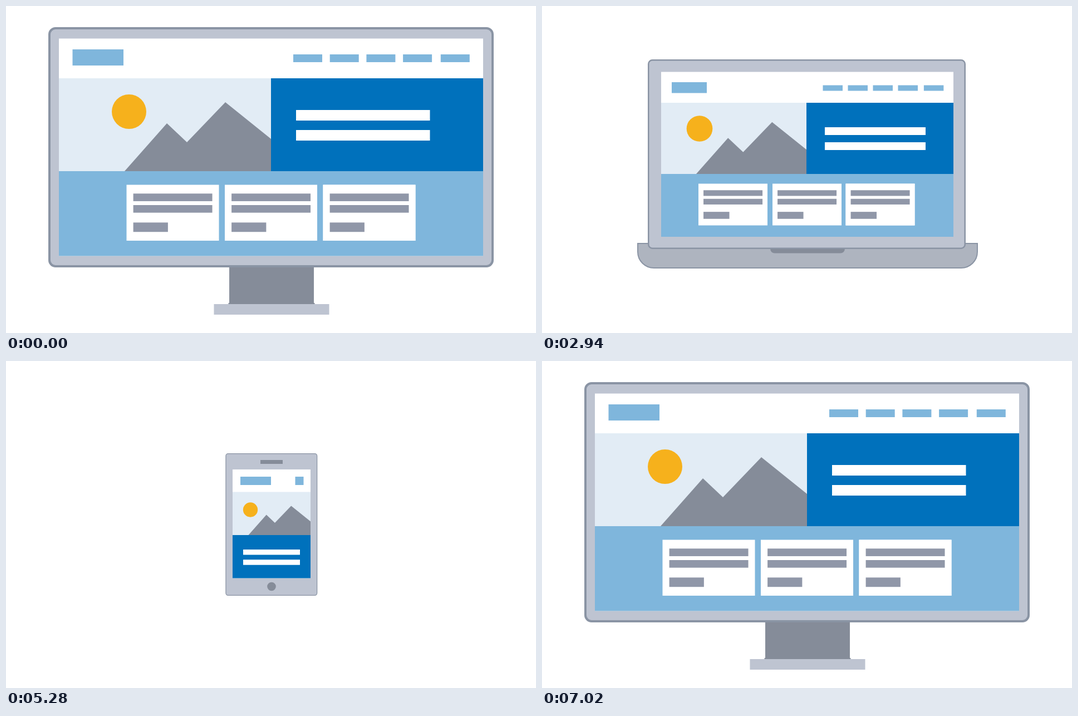
Recreate the animation shown at these times as an HTML page with a canvas. Size 952 px wide and 588 px high, loop 7050 ms.

```html
<!DOCTYPE html>
<html lang="en">
<head>
<meta charset="utf-8">
<title>Responsive layout</title>
<style>
html, body { margin: 0; width: 100%; height: 100%; overflow: hidden; background: #fff; }
canvas { display: block; }
</style>
</head>
<body>
<canvas id="stage" width="952" height="588"></canvas>
<script>
const ctx = document.getElementById('stage').getContext('2d');
const LOOP = 7050, STEP = 30;
const C = {
  shell: '#bec4d1', edge: '#8a94a4', dark: '#858c99', row: '#9097a8', base: '#aeb4bf',
  sky: '#e2ecf5', light: '#7fb6dc', blue: '#0071bc', sun: '#f6b11c', white: '#fff'
};

// body: cx, cy, width, height, border, radius, angle   screen, panel: left, top, right, bottom
// pic: right, top, bottom   nav: x, step, width, y, height   bars: x, y, width, height, gap
// card: width, height, y of row 1, y of row 2   cols: x of the four cards
const desktop = {
  body: [476, 254, 432, 800, 4, 11, -90], screen: [95, 58.5, 857, 449.5],
  pic: [476, 130, 297], panel: [476, 130, 857, 297], scale: [1], sun: [221, 190],
  logo: [119.5, 78, 91.5, 29], nav: [516, 65.7, 52, 87, 14], bars: [521, 187, 240.5, 19, 36],
  card: [166, 100.5, 321.5, 321.5], cols: [216.5, 393, 569.5, 569.5]
};
const laptop = {
  body: [475.5, 266.5, 341, 571, 2.5, 7, -90], screen: [214, 118.5, 739, 415],
  pic: [475, 174, 302], panel: [475, 174, 739, 302], scale: [.753], sun: [283, 220.5],
  logo: [233, 137, 63, 19.5], nav: [504.5, 45, 35.5, 142.5, 10], bars: [508, 218, 181, 14, 27],
  card: [124, 75, 319.5, 319.5], cols: [281, 414, 545.5, 545.5]
};
const tablet = {
  body: [477, 296, 256, 326, 1.5, 5, 0], screen: [382, 165.5, 571, 409],
  pic: [506.5, 207, 275], panel: [506.5, 207, 571, 275], scale: [.399], sun: [404, 231.5],
  logo: [396.5, 177.5, 37.5, 14], nav: [447, 22.8, 18, 181.5, 6], bars: [518.5, 222, 44.5, 7.2, 12.7],
  card: [83.5, 49.5, 287.5, 346], cols: [389, 481, 389, 481]
};
const phone = {
  body: [476.8, 294, 165, 256, 1.3, 4, 0], screen: [407, 195, 547, 390.5],
  pic: [547, 235.5, 313], panel: [407, 313, 547, 390.5], scale: [.424], sun: [439, 267.5],
  logo: [421, 208, 55, 15], nav: [480, 11, 9, 212, 6], bars: [426, 339, 102, 9.5, 18.2],
  card: [58, 35, 318, 353], cols: [416, 480, 416, 480]
};
// start, duration, from, to, lead of the size, lag of the turn
const morphs = [
  [1620, 290, desktop, laptop, 0, 0],
  [3363, 297, laptop, tablet, .33, .18],
  [4845, 330, tablet, phone, 0, 0],
  [6625, 300, phone, desktop, 0, 0]
];

const clamp = v => Math.max(0, Math.min(1, v));
const lerp = (a, b, p) => a + (b - a) * p;

// cubic-bezier(.25, .1, .25, 1)
function ease(x) {
  if (x <= 0 || x >= 1) return clamp(x);
  let lo = 0, hi = 1, u = .5;
  for (let i = 0; i < 24; i++) {
    u = (lo + hi) / 2;
    if (.75 * u * (1 - u) + u * u * u < x) lo = u; else hi = u;
  }
  const v = 1 - u;
  return .3 * v * v * u + 3 * v * u * u + u * u * u;
}
const ramp = (t, start, dur) => clamp((t - start) / dur);
const glide = (t, start, dur) => ease(ramp(t, start, dur));

function pose(t) {
  let m = morphs[0];
  for (const next of morphs) if (t >= next[0]) m = next;
  const [start, dur, from, to, lead, lag] = m;
  const p = glide(t, start, dur), bend = p * (1 - p), s = {};
  for (const key in from) s[key] = from[key].map((v, i) => lerp(v, to[key][i], p));
  for (const i of [2, 3]) s.body[i] = lerp(from.body[i], to.body[i], p + lead * bend);
  s.body[6] = lerp(from.body[6], to.body[6], p - lag * bend);
  return s;
}

function rect(color, x, y, w, h) {
  ctx.fillStyle = color;
  ctx.fillRect(x, y, w, h);
}
function box(color, [l, t, r, b]) { rect(color, l, t, r - l, b - t); }
function disc(color, x, y, r) {
  ctx.fillStyle = color;
  ctx.beginPath();
  ctx.arc(x, y, r, 0, 7);
  ctx.fill();
}
function rounded(x, y, w, h, r, fill, line) {
  ctx.beginPath();
  ctx.roundRect(x + line / 2, y + line / 2, w - line, h - line, r);
  ctx.fillStyle = fill;
  ctx.fill();
  if (!line) return;
  ctx.lineWidth = line;
  ctx.strokeStyle = C.edge;
  ctx.stroke();
}
function faded(alpha, draw) {
  if (alpha <= 0) return;
  ctx.save();
  ctx.globalAlpha = alpha;
  draw();
  ctx.restore();
}

function stand(out) {
  if (out <= 0) return;
  const y = 536 - 93 * (1 - out), flare = Math.max(0, 1.5 - (536 - y) / 5);
  rect(C.dark, 401, 440, 152, Math.max(0, y - 440));
  rect(C.dark, 401 - flare, y - 2, 152 + 2 * flare, 2);
  rect(C.shell, 373.5, y, 207, 19);
}

function keyboard(out) {
  if (out <= 0) return;
  ctx.save();
  ctx.translate(477, 426);
  ctx.scale(.9 + .1 * out, out);
  rounded(-306, 0, 612, 46, [0, 0, 29, 29], C.base, 2);
  rounded(-67, 9, 134, 9.5, [0, 0, 8, 8], C.dark, 0);
  ctx.restore();
}

function shell([cx, cy, w, h, line, r, angle]) {
  ctx.save();
  ctx.translate(cx, cy);
  ctx.rotate(angle * Math.PI / 180);
  rounded(-w / 2, -h / 2, w, h, r, C.shell, line);
  ctx.restore();
}

function card(x, y, w, h) {
  rect(C.white, x, y, w, h);
  const left = x + .073 * w;
  rect(C.row, left, y + .157 * h, .855 * w, .136 * h);
  rect(C.row, left, y + .363 * h, .855 * w, .136 * h);
  rect(C.row, left, y + .675 * h, .375 * w, .168 * h);
}

function picture(s) {
  const [r, t, b] = s.pic, k = s.scale[0];
  box(C.sky, [s.screen[0], t, r, b]);
  disc(C.sun, ...s.sun, 31 * k);
  ctx.fillStyle = C.dark;
  ctx.beginPath();
  for (const [x, y] of [[263, 0], [187, 86], [151, 52], [82, 124], [0, 58], [0, 0]])
    ctx.lineTo(r - x * k, b - y * k);
  ctx.fill();
}

function page(s, full) {
  const [l, , r, b] = s.screen;
  box(C.white, s.screen);
  faded(full, () => {
    box(C.light, [l, s.pic[2], r, b]);
    const [w, h, y1, y2] = s.card;
    for (let i = 3; i >= 0; i--) card(s.cols[i], i < 2 ? y1 : y2, w, h);
    const [x, step, nw, y, nh] = s.nav;
    for (let i = 0; i < 5; i++) rect(C.light, x + i * step + (i > 3 ? nw / 26 : 0), y, nw, nh);
  });
  box(C.blue, s.panel);
  const [x, y, w, h, gap] = s.bars;
  rect(C.white, x, y, w, h);
  rect(C.white, x, y + gap, w, h);
  picture(s);
  rect(C.light, ...s.logo);
}

function draw(t) {
  const s = pose(t);
  rect(C.white, 0, 0, 952, 588);
  stand(1 - glide(t, 1515, 130) + glide(t, 6870, 145));
  keyboard(glide(t, 1790, 125) - glide(t, 2955, 180));
  shell(s.body);
  page(s, 1 - ramp(t, 4845, 110) + ramp(t, 6750, 130));
  faded(ramp(t, 3580, 80) - ramp(t, 4845, 100), () => disc(C.dark, 477, 434, 9));
  faded(ramp(t, 5140, 130) - ramp(t, 6624, 100), () => {
    rect(C.dark, 457, 178, 40, 7);
    disc(C.dark, 477, 405.5, 7.8);
    rect(C.light, 519.5, 208, 15, 15);
  });
}

const began = performance.now();
function tick() {
  const t = (performance.now() - began) % LOOP;
  draw(Math.floor(t / STEP) * STEP);
  requestAnimationFrame(tick);
}
tick();
</script>
</body>
</html>
```
